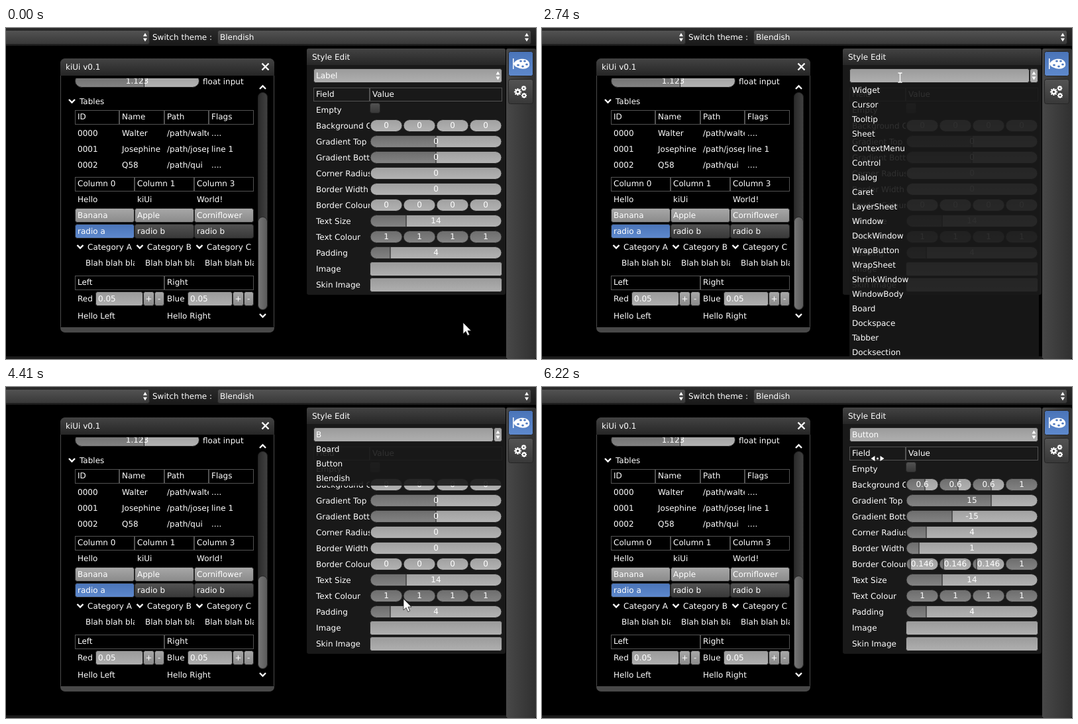
An HTML page for the animation above (8 s loop, 800x500 px).

```html
<!DOCTYPE html>
<html lang="en">
<head>
<meta charset="utf-8">
<title>Style editor</title>
<style>
  html, body { margin: 0; width: 100%; height: 100%; overflow: hidden; background: #000; }
  svg { display: block; width: 800px; height: 500px; }
  text { font: 12px "DejaVu Sans", sans-serif; fill: #fff; text-rendering: geometricPrecision; white-space: pre; }
</style>
</head>
<body>
<svg id="stage" viewBox="0 0 800 500">
  <defs id="defs"></defs>
  <g id="base"></g>
  <g id="values"></g>
  <g id="combo"></g>
  <g id="cursor"></g>
</svg>
<script>
const LOOP = 8000;
const $ = id => document.getElementById(id);

const gradient = (id, from, to, across) =>
  `<linearGradient id="${id}" x2="${across ? 1 : 0}" y2="${across ? 0 : 1}">
    <stop stop-color="${from}"/><stop offset="1" stop-color="${to}"/></linearGradient>`;

const rect = (x, y, w, h, fill, r = 0, extra = '') =>
  `<rect x="${x}" y="${y}" width="${w}" height="${h}" rx="${r}" fill="${fill}" ${extra}/>`;
const box = (x, y, w, h, fill, r = 3) =>
  rect(x + .5, y + .5, w - 1, h - 1, `url(#${fill})`, r, 'stroke="#252525"');
const frame = (x, y, w, h) => rect(x + .5, y + .5, w - 1, h - 1, 'none', 0, 'stroke="#525252"');
const text = (s, x, y, extra = '') => `<text x="${x}" y="${y}" ${extra}>${s}</text>`;
const path = (d, extra) => `<path d="${d}" ${extra}/>`;
const clip = (id, content) => `<g clip-path="url(#${id})">${content}</g>`;
const clipRect = (id, x, y, w, h) => `<clipPath id="${id}">${rect(x, y, w, h, '#fff')}</clipPath>`;
const chevron = (x, y, up = 1, s = 4.5) =>
  path(`M${x - s} ${y - 2 * up}l${s} ${s * up}l${s} ${-s * up}`, 'fill="none" stroke="#fff" stroke-width="2.4"');
const arrows = (x, y) =>
  path(`M${x - 3} ${y - 1.5}l3 -5l3 5zM${x - 3} ${y + 1.5}l3 5l3 -5z`, 'fill="#fff"');

$('defs').innerHTML =
  gradient('bar', '#2b2b2b', '#191919') +
  gradient('title', '#434343', '#262626') +
  gradient('dark', '#535353', '#383838') +
  gradient('blue', '#4a74b8', '#5e89cd') +
  gradient('button', '#a8a8a8', '#8a8a8a') +
  gradient('field', '#9a9a9a', '#b0b0b0') +
  gradient('light', '#a0a0a0', '#b3b3b3') +
  gradient('fill', '#6c6c6c', '#848484') +
  gradient('dock', '#484848', '#303030', true) +
  gradient('track', '#2a2a2a', '#414141', true) +
  gradient('thumb', '#777', '#5a5a5a', true) +
  clipRect('body', 83, 76, 321, 376) +
  clipRect('labels', 464, 110, 85, 294) +
  [104, 194, 284].map((x, i) => clipRect('third' + i, x, 345, 90, 24)).join('') +
  [104, 171, 239, 306].map((x, i) => clipRect('quarter' + i, x, 120, 67, 100)).join('');

let pillCount = 0;
// A rounded number field, filled up to a fraction of its width.
function pill(x, y, w, value, amount, h = 19) {
  const id = 'pill' + pillCount++;
  const edge = Math.round(w * amount);
  const shape = fill => rect(x + .5, y + .5, w - 1, h - 1, fill, h / 2);
  return `<clipPath id="${id}">${shape('#fff')}</clipPath>` + shape('url(#light)') +
    clip(id, rect(x, y, edge, h, 'url(#fill)') +
      (amount > 0 && amount < 1 ? rect(x + edge - 1, y, 1, h, '#222') : '')) +
    rect(x + .5, y + .5, w - 1, h - 1, 'none', h / 2, 'stroke="#252525"') +
    text(value, x + w / 2, y + 13, 'text-anchor="middle"');
}

function headers(names, xs, y, h = 22) {
  return names.map((n, i) => frame(xs[i], y, xs[i + 1] - xs[i], h) + text(n, xs[i] + 4, y + 14)).join('');
}

function topBar() {
  return rect(0, 0, 800, 27, 'url(#bar)') + box(-10, 3, 227, 22, 'dark') + arrows(210, 14) +
    text('Switch theme :', 221, 18) + box(319, 3, 474, 22, 'dark') + text('Blendish', 323, 18) +
    arrows(786, 14) + rect(0, 496, 755, 4, '#1b1b1b');
}

function gear(x, y, r) {
  let teeth = '';
  for (let i = 0; i < 8; i++) {
    const a = i * Math.PI / 4;
    teeth += `M${x} ${y}l${(r * 1.4 * Math.cos(a)).toFixed(2)} ${(r * 1.4 * Math.sin(a)).toFixed(2)}`;
  }
  return path(teeth, 'stroke="#fff" stroke-width="2"') +
    `<circle cx="${x}" cy="${y}" r="${r}" fill="#fff"/><circle cx="${x}" cy="${y}" r="${r * .42}" fill="#444"/>`;
}

function dock() {
  const holes = [[773, 56], [777, 50], [783, 50], [786, 55], [780, 58]]
    .map(([x, y]) => `<ellipse cx="${x}" cy="${y}" rx="1.9" ry="1.5" fill="#4f7ac0"/>`).join('');
  return rect(755, 31, 45, 469, 'url(#dock)', 3) + box(758, 35, 38, 38, 'blue') +
    path('M766 54C769 48 776 46 782 47C789 48 791 53 790 57C788 62 779 63 773 60C769 59 767 57 766 54Z', 'fill="#fff"') +
    holes + rect(765, 46, 1.5, 16, '#fff') + box(758, 77, 38, 38, 'dark') +
    gear(772.5, 96.5, 4) + gear(781.5, 91, 2.7) + gear(782, 102, 2.9);
}

function demoWindow() {
  const thirds = [104, 194, 284, 374], quarters = [104, 171, 239, 306, 374];
  const rows = [
    ['0000', 'Walter', '/path/walter', '....'],
    ['0001', 'Josephine', '/path/josephine', 'line 1'],
    ['0002', 'Q58', '/path/qui', '....']
  ];
  const cells = rows.map((row, r) => row.map((s, c) =>
    clip('quarter' + c, text(s, quarters[c] + 4, 163 + 24 * r))).join('')).join('');
  const columns = [
    ['Hello', 'Banana', 'radio a', 'Category A'],
    ['kiUi', 'Apple', 'radio b', 'Category B'],
    ['World!', 'Corniflower', 'radio b', 'Category C']
  ].map(([hello, name, radio, category], i) => {
    const x = thirds[i];
    return text(hello, x + 4, 263) +
      box(x, 272, 90, 22, 'button') + text(name, x + 4, 287) +
      box(x, 296, 90, 22, i ? 'dark' : 'blue') + text(radio, x + 4, 311) +
      chevron(x + 8, 330) + text(category, x + 19, 335) +
      clip('third' + i, text('Blah blah blah', x + 16, 359));
  }).join('');
  const spinner = (label, x, fx, w) => text(label, x, 413) +
    box(fx, 398, w, 22, 'field') + text('0.05', fx + 4, 413) +
    box(fx + w, 398, 17, 22, 'button') + text('+', fx + w + 3.5, 413) +
    box(fx + w + 17, 398, 15, 22, 'button') + text('-', fx + w + 22, 413);

  return rect(82.5, 46.5, 322, 413, '#000', 8, 'stroke="#4a4a4a"') +
    path('M82 72V54q0 -8 8 -8h307q8 0 8 8v18z', 'fill="url(#title)"') +
    path('M82 452h323q0 8 -8 8h-307q-8 0 -8 -8z', 'fill="#484848"') +
    text('kiUi v0.1', 90, 63) +
    path('M386.5 53.5l10 10m0 -10l-10 10', 'stroke="#fff" stroke-width="2.4"') +
    clip('body', pill(104, 70, 188, '1.123', .56, 20).replace('y="83"', 'y="84"') +
      text('float input', 297, 85)) +
    chevron(99.5, 110) + text('Tables', 111, 115) +
    headers(['ID', 'Name', 'Path', 'Flags'], quarters, 124) + cells +
    headers(['Column 0', 'Column 1', 'Column 3'], thirds, 225) + columns +
    headers(['Left', 'Right'], [104, 239, 374], 374) +
    spinner('Red', 108, 135, 72) + spinner('Blue', 243, 274, 68) +
    text('Hello Left', 108, 439) + text('Hello Right', 243, 439) +
    chevron(387.5, 90, -1) + chevron(387.5, 434) +
    rect(380.5, 97.5, 14, 328, 'url(#track)', 7, 'stroke="#222"') +
    rect(380.5, 285.5, 14, 140, 'url(#thumb)', 7, 'stroke="#222"');
}

function stylePanel() {
  const names = ['Empty', 'Background Colour', 'Gradient Top', 'Gradient Bottom', 'Corner Radius',
    'Border Width', 'Border Colour', 'Text Size', 'Text Colour', 'Padding', 'Image', 'Skin Image'];
  return rect(454, 31, 300, 372, '#191919', 3) +
    path('M454 56V34q0 -3 3 -3h294q3 0 3 3v22z', 'fill="url(#title)"') +
    text('Style Edit', 462, 48) + headers(['Field', 'Value'], [464, 549, 749], 90, 21) +
    clip('labels', names.map((n, i) => text(n, 468, 128 + 24 * i)).join('')) +
    rect(549.5, 113.5, 15, 15, 'url(#dark)', 3, 'stroke="#252525"') +
    box(549, 353, 200, 22, 'field') + box(549, 377, 200, 22, 'field');
}

const wide = (row, value, amount) => pill(549.5, 138 + 24 * row, 199, value, amount);
const quad = (row, values) => values.map((v, i) => pill(549.5 + 50 * i, 138 + 24 * row, 49, v, v)).join('');
const styleValues = s =>
  quad(0, s.background) + wide(1, s.top, .5 + s.top / 100) + wide(2, s.bottom, .5 + s.bottom / 100) +
  wide(3, s.radius, s.radius / 26) + wide(4, s.border, s.border / 10) + quad(5, s.borderColour) +
  wide(6, 14, .277) + quad(7, [1, 1, 1, 1]) + wide(8, 4, 4 / 26);

const labelStyle = { background: [0, 0, 0, 0], top: 0, bottom: 0, radius: 0, border: 0, borderColour: [0, 0, 0, 0] };
const buttonStyle = { background: [.6, .6, .6, 1], top: 15, bottom: -15, radius: 4, border: 1,
  borderColour: [.146, .146, .146, 1] };

const ITEMS = ('Widget Cursor Tooltip Sheet ContextMenu Control Dialog Caret LayerSheet Window DockWindow ' +
  'WrapButton WrapSheet ShrinkWindow WindowBody Board Dockspace Tabber Docksection Label Button List Blendish').split(' ');
const startsWith = q => s => s.startsWith(q) && (q !== 'C' || s !== 'Caret');

const TYPED = [[1060, 'Label'], [1920, 'Labe'], [2160, 'Lab'], [2280, 'La'], [2490, 'L'], [2740, ''], [4410, 'B']];
const MOVES = [
  { start: 240, end: 940, steps: 7, to: [540, 75] },
  { start: 3450, end: 3780, steps: 4, to: [600, 320] },
  { start: 5160, end: 5390, steps: 3, to: [505, 106] },
  { start: 5730, end: 5730, steps: 1, to: [506, 108] }
];
const within = (t, a, b) => t >= a && t < b;
const ease = p => p * p * (3 - 2 * p);

// The pointer is sampled in discrete steps along each eased move.
function pointerAt(t) {
  let pos = [690, 445];
  for (const { start, end, steps, to } of MOVES) {
    if (t < start) break;
    const gap = (end - start) / (steps - 1) || 1;
    const p = ease(Math.min(steps, Math.floor((t - start) / gap + .05) + 1) / steps);
    pos = pos.map((v, i) => Math.round(v + (to[i] - v) * p));
  }
  return pos;
}

function stateAt(t) {
  const open = within(t, 1060, 6220);
  const [x, y] = pointerAt(t);
  let query = t < 1060 ? 'Label' : 'Button';
  if (open) for (const [at, s] of TYPED) if (t >= at) query = s;
  const list = open && t >= 1180 ? ITEMS.filter(startsWith(query)) : [];
  const caret = within(t, 1800, 2040) || within(t, 4650, 5160);
  const shape = t >= 6220 ? 'resize' : y < 83 ? 'beam' : 'arrow';
  return { open, x, y, query, list, caret, shape, style: t < 6220 ? 'label' : 'button' };
}

function comboBox({ open, query, list, x, y, caret }) {
  let out = open
    ? box(464, 61, 272, 22, 'field') + box(736, 61, 13, 22, 'field')
    : box(464, 61, 285, 22, 'field');
  out += arrows(742.5, 72) + text(query, 468, 76, 'id="query"');
  if (list.length) out += rect(464, 83, 286, list.length * 22, '#191919', 0, 'fill-opacity=".9"');
  const hover = x >= 464 && x < 750 ? Math.floor((y - 83) / 22) : -1;
  list.forEach((name, i) => {
    const top = 83 + 22 * i;
    if (i === hover) out += rect(464, top, 286, 22, 'url(#blue)');
    out += text(name, 468, top + 15);
  });
  return out + (caret ? rect(0, 65, 1, 14, '#fff', 0, 'id="caret"') : '');
}

const CURSORS = {
  arrow: path('M0 0V17L4 13.3L6.8 19.5L9.6 18.2L6.9 12.2H12Z', 'fill="#fff" stroke="#222" stroke-width=".8"'),
  beam: path('M-3 -7h2.2l.8 .8l.8 -.8h2.2M0 -6V6M-3 7h2.2l.8 -.8l.8 .8h2.2',
    'fill="none" stroke="#fff" stroke-width="1.3" transform="translate(.5 0)"'),
  resize: path('M-9.5 0l6 -4v8zM10.5 0l-6 -4v8z', 'fill="#fff"') + '<circle cx=".5" r="1.5" fill="#fff"/>'
};

const drawn = {};
function update(id, key, make) {
  if (drawn[id] === key) return false;
  drawn[id] = key;
  $(id).innerHTML = make();
  return true;
}

function render(t) {
  const s = stateAt(t);
  update('values', s.style, () => styleValues(s.style === 'label' ? labelStyle : buttonStyle));
  const changed = update('combo', JSON.stringify(s), () => comboBox(s));
  if (changed && s.caret) $('caret').setAttribute('x', Math.ceil(468 + $('query').getComputedTextLength()));
  update('cursor', s.shape, () => CURSORS[s.shape]);
  $('cursor').setAttribute('transform', `translate(${s.x} ${s.y})`);
}

$('base').innerHTML = topBar() + demoWindow() + stylePanel() + dock();
const begin = performance.now();
function tick() {
  render((performance.now() - begin) % LOOP);
  requestAnimationFrame(tick);
}
tick();
</script>
</body>
</html>
```
